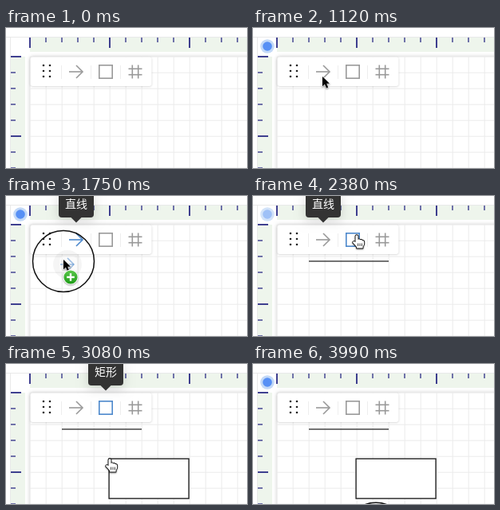
Recreate the animation shown at these times as an HTML page with a canvas. Size 302 by 176 pixels, loop 4060 ms.

```html
<!DOCTYPE html>
<html lang="zh">
<head>
<meta charset="utf-8">
<title>Drag to draw</title>
<style>
html, body { margin: 0; width: 100%; height: 100%; overflow: hidden; background: #fff; }
canvas { display: block; width: 302px; height: 176px; }
</style>
</head>
<body>
<canvas id="stage"></canvas>
<script>
const W = 302, H = 176, LOOP = 4060, STEP = 70;
const canvas = document.getElementById('stage');
const ratio = window.devicePixelRatio || 1;
canvas.width = W * ratio;
canvas.height = H * ratio;
const c = canvas.getContext('2d');

const GRAY = '#999', BLUE = '#4c88cc', NAVY = '#2b2b85';

// Pointer path: time, x, y
const path = [
  [70, 220, 134], [560, 98, 67], [1120, 87, 61], [1330, 84, 51], [1400, 83, 49],
  [1680, 72, 80], [1820, 72, 80], [2240, 130, 49], [2380, 130, 49], [2520, 129, 58],
  [2730, 129, 98], [2800, 129, 116], [2870, 129, 118], [3080, 130, 119],
  [3290, 130, 119], [3430, 142, 150], [3500, 142, 150], [3640, 152, 184]
];

const clamp = v => Math.max(0, Math.min(1, v));
const ramp = (t, a, b) => clamp((t - a) / (b - a));
const within = (t, a, b) => t >= a && t < b;

function pointerAt(t) {
  let i = 0;
  while (i < path.length - 2 && t > path[i + 1][0]) i++;
  const [t0, x0, y0] = path[i], [t1, x1, y1] = path[i + 1];
  let k = ramp(t, t0, t1);
  if (t1 - t0 > 400) k = k * k * (3 - 2 * k);
  return [x0 + (x1 - x0) * k, y0 + (y1 - y0) * k];
}

function line(color, width, ...p) {
  c.strokeStyle = color;
  c.lineWidth = width;
  c.beginPath();
  for (let i = 0; i < p.length; i += 2) c.lineTo(p[i], p[i + 1]);
  c.stroke();
}

function disc(x, y, r, color) {
  c.fillStyle = color;
  c.beginPath();
  c.arc(x, y, r, 0, 7);
  c.fill();
}

function box(x, y, w, h, r, color) {
  c.fillStyle = color;
  c.beginPath();
  c.roundRect(x, y, w, h, r);
  c.fill();
}

function faded(alpha, draw) {
  if (alpha <= 0) return;
  c.save();
  c.globalAlpha = alpha;
  draw();
  c.restore();
}

function shadow(color, blur, y = 0) {
  c.shadowColor = color;
  c.shadowBlur = blur * ratio;
  c.shadowOffsetY = y * ratio;
}

function drawBoard() {
  c.fillStyle = '#fff';
  c.fillRect(0, 0, W, H);
  line('#e9e9e9', 1, 0, 11.5, W, 11.5);
  line('#e9e9e9', 1, 5.5, 11, 5.5, H);
  c.fillStyle = '#eef5ec';
  c.fillRect(30, 12, W - 30, 18);
  c.fillRect(6, 36, 18, H - 36);
  c.save();
  shadow('rgba(0,0,0,.2)', 5);
  box(30, 36, W, H, 3, '#fff');
  c.restore();
  for (let i = 0; i < 14; i++) {
    const x = 30 + i * 20, y = 36 + i * 20, major = i % 5 === 0;
    const len = major ? 13 : 6, wide = major ? 1.8 : 1.3;
    line('#ebebeb', 1, x + .2, 36, x + .2, H);
    line('#ebebeb', 1, 30, y + .2, W, y + .2);
    line(NAVY, wide, x, 12, x, 12 + len);
    line(NAVY, wide, 6, y, 6 + len, y);
  }
}

function arrowIcon(x, y, color) {
  line(color, 1.6, x - 9, y, x + 8, y);
  line(color, 1.6, x, y - 8, x + 8, y, x, y + 8);
}

function rectIcon(x, y, color) {
  c.strokeStyle = color;
  c.lineWidth = 1.6;
  c.strokeRect(x - 8.2, y - 8.2, 16.4, 16.4);
}

function drawToolbar(t) {
  c.save();
  shadow('rgba(0,0,0,.2)', 2.5, .5);
  box(30.5, 36.5, 152, 36.5, 3, '#fff');
  c.restore();
  for (const x of [69.5, 106.5, 143.5]) line('#eee', 1, x, 47, x, 64);
  for (const x of [47, 55])
    for (const y of [47, 54, 61]) disc(x, y, 1.3, '#222');
  arrowIcon(88, 55, within(t, 1190, 1890) ? BLUE : GRAY);
  rectIcon(125, 55, within(t, 2240, 3360) ? BLUE : GRAY);
  for (const d of [-3.7, 3.7]) {
    line(GRAY, 1.6, 162 + d, 46.5, 162 + d, 63.5);
    line(GRAY, 1.6, 153.5, 55 + d, 170.5, 55 + d);
  }
}

function drawDot(t) {
  const p = t % 3500;
  const a = ramp(p, 0, 420) * (1 - ramp(p, 1750, 2830));
  faded(Math.min(1, a * 1.8), () => disc(18, 23, 8.8, '#c3d9f7'));
  faded(a, () => disc(18, 23, 5.8, '#5790f5'));
}

function tooltip(text, x, alpha) {
  faded(alpha, () => {
    c.save();
    shadow('rgba(0,0,0,.15)', 14, 4);
    box(x - 22, -6, 44, 33, 4, '#333');
    c.restore();
    c.fillStyle = '#333';
    c.beginPath();
    c.moveTo(x - 7, 26.5);
    c.lineTo(x + 7, 26.5);
    c.lineTo(x, 33.5);
    c.fill();
    c.fillStyle = '#fff';
    c.font = '14px "Noto Sans CJK SC", "Noto Sans CJK", sans-serif';
    c.textAlign = 'center';
    c.textBaseline = 'alphabetic';
    c.fillText(text, x, 15);
  });
}

function ring(x, y) {
  c.strokeStyle = '#111';
  c.lineWidth = 1.5;
  c.beginPath();
  c.arc(x, y, 38.5, 0, 7);
  c.stroke();
}

function shape(d, fill, stroke, width) {
  const p = new Path2D(d);
  c.lineJoin = 'round';
  c.strokeStyle = stroke;
  c.lineWidth = width;
  c.stroke(p);
  c.fillStyle = fill;
  c.fill(p);
}

function drawPointer(x, y, hand) {
  c.save();
  c.translate(x, y);
  shadow('rgba(0,0,0,.3)', 2, 1);
  if (hand) {
    shape('M-1.5 9V1.2Q0-.8 1.5 1.2V6Q3 4.6 4.3 6.3Q5.8 5.2 7 7Q9 6.6 9.2 8.6V11Q9 13 7.6 14.5V16.5H0V15Q-2 12.5-4.8 9.8Q-5 7.6-3 8.2Z', '#fff', '#111', 1.8);
    c.shadowColor = 'transparent';
    for (const d of [1.6, 4, 6.4]) line('#111', .8, d, 10.5, d, 14);
  } else {
    shape('M0 0V12.2L2.9 9.6L5 14.4L7.2 13.5L5.1 8.7H8.9Z', '#000', '#fff', 1.6);
  }
  c.restore();
}

function badge(x, y) {
  c.save();
  shadow('rgba(0,0,0,.35)', 2, 1);
  disc(x, y, 9.5, '#fff');
  c.restore();
  const g = c.createLinearGradient(0, y - 9, 0, y + 9);
  g.addColorStop(0, '#5cc84c');
  g.addColorStop(1, '#1c9a16');
  disc(x, y, 8.6, g);
  line('#fff', 2.4, x - 4.8, y, x + 4.8, y);
  line('#fff', 2.4, x, y - 4.8, x, y + 4.8);
}

function drawDrag(t, x, y) {
  if (within(t, 1400, 1820)) {
    disc(x + 5, y + 6, 18, 'rgba(0,0,0,.04)');
    faded(.55, () => {
      box(x - 5, y - 4, 22, 20, 5, '#fff');
      arrowIcon(x + 5, y + 6, BLUE);
    });
  }
  if (within(t, 2520, 2870)) {
    faded(.3, () => {
      box(x - 14, y - 12, 20, 20, 2, '#f2f4f7');
      rectIcon(x - 3.7, y - 2.5, '#8a9cb4');
    });
  }
  if (within(t, 1610, 1820) || within(t, 2590, 2870)) ring(x, y + 2);
}

function draw(t) {
  c.setTransform(ratio, 0, 0, ratio, 0, 0);
  drawBoard();
  if (t >= 1820) line('#444', 1.5, 70, 82, 170, 82);
  if (t >= 2870) {
    c.fillStyle = '#fff';
    c.fillRect(129, 119, 100, 50);
    c.strokeStyle = '#222';
    c.lineWidth = 1.4;
    c.strokeRect(129.1, 119.1, 100, 50);
  }
  drawToolbar(t);
  drawDot(t);
  tooltip('直线', 88, ramp(t, 1260, 1400) * (1 - ramp(t, 2380, 2520)));
  tooltip('矩形', 125, ramp(t, 2380, 2520) * (1 - ramp(t, 3500, 3640)));

  const [x, y] = pointerAt(t);
  const dragging = within(t, 1400, 1820) || within(t, 2520, 2870);
  const hand = within(t, 1190, 1400) || within(t, 2170, 2520) || within(t, 2940, 3360);
  drawDrag(t, x, y);
  if (t >= 70) drawPointer(x, y, hand);
  if (dragging) badge(x + 9, y + 22);
  if (t >= 3990) ring(154, 212.8);
}

function tick(now) {
  draw(Math.floor((now % LOOP) / STEP) * STEP);
  requestAnimationFrame(tick);
}
draw(0);
requestAnimationFrame(tick);
</script>
</body>
</html>
```
